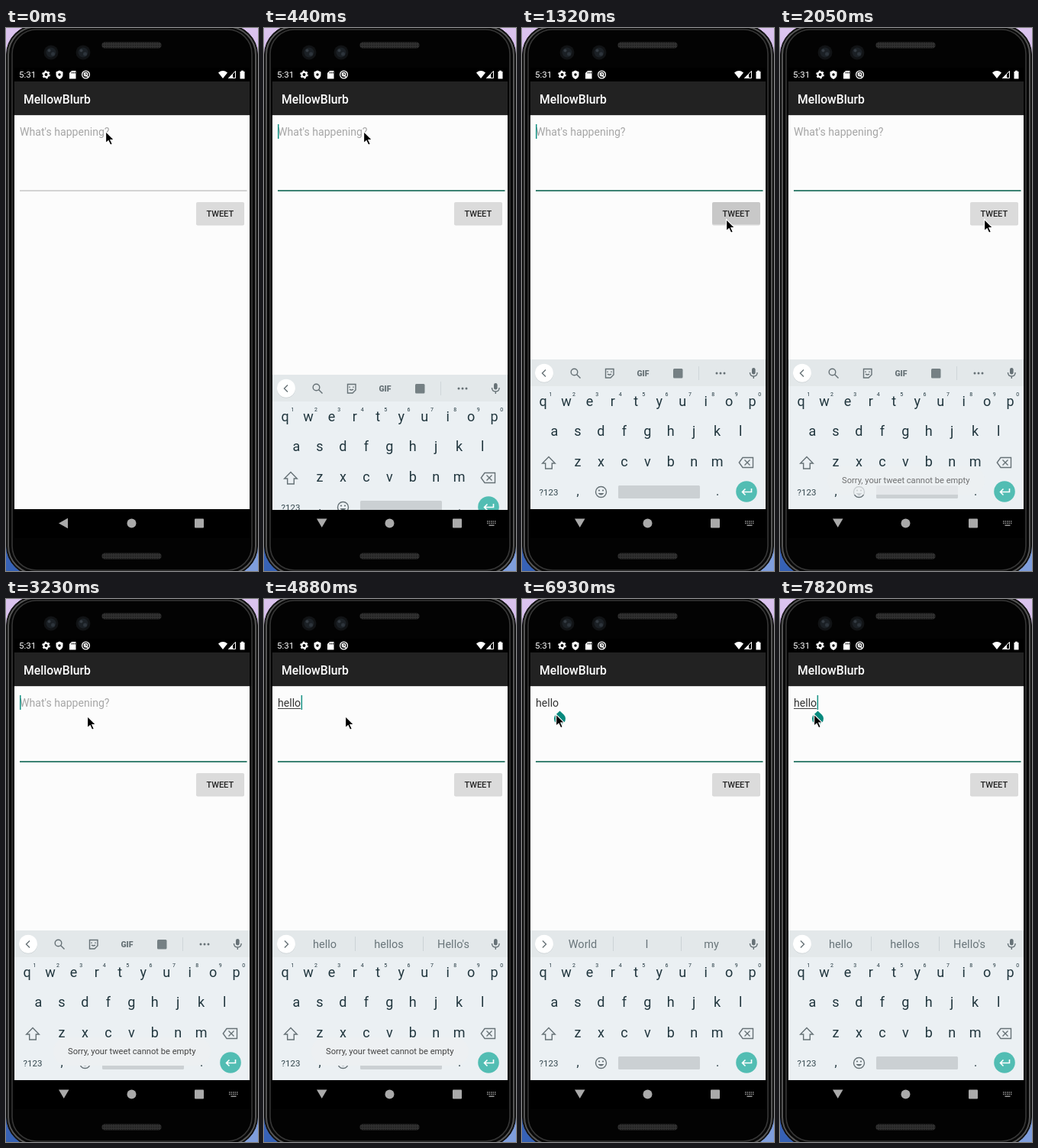
An HTML page that plays this animation: 330x711 px, repeating every 8000 ms.

```html
<!DOCTYPE html>
<html lang="en">
<head>
<meta charset="utf-8">
<title>Compose screen</title>
<style>
html, body { margin: 0; width: 330px; height: 711px; overflow: hidden; background: #000; }
svg { display: block; font-family: Roboto, sans-serif; }
.mid { text-anchor: middle; }
.line { fill: none; stroke: #667176; stroke-width: 1.4; }
</style>
</head>
<body>
<svg width="330" height="711" viewBox="0 0 330 711">
  <defs>
    <linearGradient id="wall" x2="0" y2="1">
      <stop offset="0" stop-color="#dcc4ef"/><stop offset=".5" stop-color="#8f86c8"/><stop offset="1" stop-color="#3561b5"/>
    </linearGradient>
    <pattern id="mesh" width="3" height="3" patternUnits="userSpaceOnUse">
      <rect width="3" height="3" fill="#303030"/><circle cx="1.5" cy="1.5" r=".8" fill="#191919"/>
    </pattern>
    <clipPath id="screen"><rect x="11" y="52" width="308" height="579"/></clipPath>
  </defs>

  <!-- phone -->
  <rect width="330" height="711" fill="url(#wall)"/>
  <rect x="290" y="660" width="40" height="51" fill="#7f9edd"/>
  <rect x=".5" y="-4" width="329" height="721" rx="39" fill="#080808" stroke="#1c1c1c"/>
  <rect x="3" y="-1.500" width="324" height="716" rx="36.500" fill="none" stroke="#555" stroke-width="2"/>
  <rect x="8" y="2" width="314" height="708" rx="32" fill="#030303" stroke="#363636" stroke-width="1.600"/>
  <g id="cameras"></g>
  <rect x="125.500" y="18.500" width="78" height="8" rx="4" fill="url(#mesh)"/>
  <rect x="125.500" y="687.500" width="78" height="8" rx="4" fill="url(#mesh)"/>
  <rect x="11" y="52" width="308" height="616"/>

  <!-- status bar -->
  <g fill="#fff">
    <text x="17" y="65.300" font-size="11.500">5:31</text>
    <circle cx="52.500" cy="61" r="3.100" fill="none" stroke="#fff" stroke-width="2.200"/>
    <circle cx="52.500" cy="61" r="4.700" fill="none" stroke="#fff" stroke-width="1.400" stroke-dasharray="2.400 2.520"/>
    <path d="M70 55.500l4.500 2v3.500q0 4-4.500 6q-4.500-2-4.500-6v-3.500z"/>
    <circle cx="70" cy="61" r="1.700" fill="#000"/>
    <path d="M86 56h5.500v10.500h-8.500v-7.500z"/>
    <path d="M86.300 57.500v2m2-2v2m2-2v2" stroke="#000"/>
    <g fill="none" stroke="#fff" stroke-width="1.300">
      <circle cx="104.500" cy="61" r="4.900"/><circle cx="104.500" cy="60.700" r="2.200"/><path d="M102 59l5.500 5.500"/>
    </g>
    <path d="M278 58.500q6-4.800 12 0l-6 7.500z"/>
    <path d="M300.500 56.500v9h-9z" fill="none" stroke="#fff"/><path d="M297 60v6h-6z"/>
    <path d="M306.500 57h1.500v-1.300h3v1.300h1.500v9.500h-6z"/>
  </g>

  <!-- app -->
  <rect x="11" y="70" width="308" height="44" fill="#222"/>
  <text x="23" y="98.600" font-size="15.700" font-weight="500" fill="#fff">MellowBlurb</text>
  <rect x="11" y="114" width="308" height="516" fill="#fcfcfc"/>
  <rect x="11" y="114" width="308" height="1" opacity=".12"/>
  <rect id="rule" x="18" width="297.500"/>
  <text id="field" x="18" y="141" font-size="14.100"></text>
  <rect id="composing" x="18" y="143" height="1" fill="#444"/>
  <rect id="caret" y="126" width="1.500" height="19" fill="#159184"/>
  <path id="handle" d="M49.500 146.500l5.300 5a7.500 7.500 0 1 1-10.600 0z" fill="#07897d"/>
  <rect x="249" y="229" width="63" height="29.500" rx="2" fill="#000" opacity=".14"/>
  <rect id="button" x="249" y="228" width="63" height="29" rx="2"/>
  <text x="280.300" y="247" class="mid" font-size="11" font-weight="500" fill="#222">TWEET</text>

  <!-- keyboard -->
  <g clip-path="url(#screen)">
    <g id="keyboard">
      <rect x="11" y="434" width="308" height="196" fill="#ebf0f3"/>
      <rect x="11" y="434" width="308" height="35" fill="#e3e8ea"/>
      <circle cx="29" cy="452.500" r="12" fill="#c9cfd2"/><circle cx="29" cy="451.700" r="12" fill="#fff"/>
      <path id="chevron" class="line"/>
      <g id="tools">
        <circle cx="68.500" cy="450.500" r="4.300" class="line"/><path d="M71.500 453.500l5 5" class="line"/>
        <path d="M109.500 446.500h10.500v7.500l-4 4h-6.500z" class="line"/>
        <path d="M112 449.500v1.500m5-1.500v1.500m-5 2q2.500 2 5 0" class="line"/>
        <text x="158.500" y="456" class="mid" font-size="10.500" font-weight="900" fill="#667176">GIF</text>
        <rect x="198" y="446" width="12.500" height="12.500" rx="1.500" fill="#758084"/>
        <path d="M231.500 443v18" stroke="#d0d6d9"/>
        <g fill="#667176"><circle cx="255" cy="452" r="1.500"/><circle cx="260" cy="452" r="1.500"/><circle cx="265" cy="452" r="1.500"/></g>
      </g>
      <g id="words" font-size="14.500" fill="#69757a" class="mid">
        <path d="M119.500 442v19M208.500 442v19" stroke="#cbd2d5"/>
        <text x="79.500" y="457"></text><text x="163.500" y="457"></text><text x="248" y="457"></text>
      </g>
      <rect x="301" y="445" width="4.600" height="8.500" rx="2.300" fill="#667176"/>
      <path d="M298.500 451q0 5 4.800 5t4.800-5M303.300 456v3" class="line"/>
      <g id="keys" class="mid" fill="#21363e"></g>
      <path d="M35 561.500l8.300 8.500h-4v7h-8.600v-7h-4z" class="line"/>
      <path d="M289 562.500h13.500v13h-13.500l-4.700-6.500zM291.500 565.500l7 7m0-7l-7 7" class="line"/>
      <text x="35" y="611.500" class="mid" font-size="11.500" fill="#34474e">?123</text>
      <circle cx="103.500" cy="607.500" r="7" class="line"/>
      <path d="M99.500 609q4 5 8 0z" fill="#667176"/>
      <circle cx="101" cy="605.500" r="1.100" fill="#667176"/><circle cx="106" cy="605.500" r="1.100" fill="#667176"/>
      <rect x="126" y="599" width="107" height="17" rx="1.500" fill="#cbd0d3"/>
      <circle cx="294" cy="607" r="13.800" fill="#52bdb3"/>
      <path d="M300.500 603v4.500h-12m4-4l-4 4l4 4" fill="none" stroke="#fff" stroke-width="1.600"/>
    </g>
  </g>
  <g id="toast">
    <rect x="62" y="574" width="206" height="37" rx="18.500" fill="#edf0f2"/>
    <text x="164.800" y="596.300" class="mid" font-size="11.150" fill="#444">Sorry, your tweet cannot be empty</text>
  </g>

  <!-- navigation bar -->
  <g fill="#aaa">
    <path id="back"/>
    <circle cx="164.500" cy="648.500" r="6"/><rect x="247" y="642.500" width="12" height="12" rx="1"/>
    <g id="switcher" stroke="#999" stroke-width="1.400">
      <path d="M292 646h12m-12 2.500h12" stroke-dasharray="1.400 1.100"/><path d="M294.500 651.300h7"/>
    </g>
  </g>
  <path id="mouse" d="M-.4.600v15l3.500-3 2.600 5.700 2.600-1.200-2.500-5.500h4.800z" fill="#000" stroke="#fff" stroke-width="1.100"/>
</svg>
<script>
const LOOP = 8000, STEP = 147;
const $ = id => document.getElementById(id);
const set = (id, attrs) => { for (const k in attrs) $(id).setAttribute(k, attrs[k]); };
const show = (id, on) => set(id, { visibility: on ? "visible" : "hidden" });
const ramp = (t, a, b) => Math.min(1, Math.max(0, (t - a) / (b - a)));

$("cameras").innerHTML = [59, 101].map(x =>
  `<circle cx="${x}" cy="32" r="9.500" fill="#111315"/><circle cx="${x}" cy="32" r="6.500" fill="#1b2025"/>
   <circle cx="${x - 2.5}" cy="29.500" r="2" fill="#343b42"/><circle cx="${x + 2.5}" cy="34" r="2.500" fill="#2d343b"/>`).join("");

const label = (x, y, size, s) => `<text x="${x}" y="${y}" font-size="${size}">${s}</text>`;
const row = (letters, x, y) => [...letters].map((c, i) => label(x + 30.45 * i, y, 18, c)).join("");
$("keys").innerHTML = row("qwertyuiop", 27.5, 495) + row("asdfghjkl", 42.5, 534) + row("zxcvbnm", 73, 574)
  + label(73, 611.5, 16, ",") + label(256, 611.5, 16, ".")
  + [..."1234567890"].map((c, i) => label(37.5 + 30.4 * i, 482, 7, c)).join("");

// time, typed text, suggestions
const typing = [
  [0, "", ""],
  [4130, "h", "h he how"],
  [4280, "he", "he her hey"],
  [4580, "hel", "hel help held"],
  [4730, "hell", "hell hello he'll"],
  [4880, "hello", "hello hellos Hello's"],
  [5320, "hello ", "World I my"],
  [7370, "hello", "hello hellos Hello's"],
];
const textWidth = [0, 7.8, 15.2, 18.7, 22.1, 30.1, 33.6];

// pointer stops: time, x, y
const stops = [
  [0, 131, 135], [590, 131, 135], [1170, 268, 262], [1320, 268, 250], [2200, 268, 250], [2780, 107, 153],
  [5620, 107, 153], [5890, 41, 131], [6200, 41, 131], [6640, 45, 150.5], [LOOP, 45, 150.5],
];
const caretOn = [[150, 740], [1170, 1760], [2190, 2780], [3230, 3830], [4130, 5760], [6350, 6930], [7080, LOOP]];

function pointer(t) {
  const i = stops.findIndex(s => s[0] > t);
  const [t0, x0, y0] = stops[i - 1], [t1, x1, y1] = stops[i];
  const u = ramp(t, t0, t1), e = u * u * (3 - 2 * u);
  return [x0 + (x1 - x0) * e, y0 + (y1 - y0) * e];
}

function draw(t) {
  const q = Math.floor((t + 10) / STEP) * STEP; // the screen refreshes in steps
  const [, text, hints] = typing.filter(s => s[0] <= t).pop();
  const focused = t >= 150, open = t >= 290;

  $("field").textContent = text || "What's happening?";
  set("field", { fill: text ? "#333" : "#a6a6a6" });
  set("composing", { width: textWidth[text.length] });
  show("composing", text && !text.endsWith(" "));
  const caretX = 18 + (t >= 7080 ? textWidth[5] : textWidth[text.length]);
  set("caret", { x: caretX + (text ? .5 : 0) });
  show("caret", caretOn.some(([a, b]) => t >= a && t < b));
  show("handle", t >= 6790);
  set("rule", focused ? { y: 212, height: 2, fill: "#3c8273" } : { y: 212.3, height: 1.5, fill: "#c6c6c6" });
  set("button", { fill: t >= 1320 && t < 1470 ? "#c8c8c8" : "#dbdbdb" });

  const rise = 1 - (1 - ramp(q, 200, 720)) ** 3.7;
  set("keyboard", { transform: `translate(0 ${Math.round(197 * (1 - rise))})` });
  show("keyboard", open);
  show("tools", open && !text);
  show("words", open && text);
  set("chevron", { d: text ? "M27 447.500l4.500 4.500l-4.500 4.500" : "M31 447.500l-4.500 4.500l4.500 4.500" });
  const words = hints.split(" ");
  $("words").querySelectorAll("text").forEach((el, i) => el.textContent = words[i] || "");

  set("toast", { opacity: t < 1760 ? 0 : ramp(q, 1650, 2200) * (1 - ramp(q, 5050, 5430)) });
  set("back", { d: open ? "M69 642.500h13.500l-6.750 11.500z" : "M69 648.500l12-6.700v13.400z" });
  show("switcher", open);
  set("mouse", { transform: `translate(${pointer(Math.min(q, LOOP - 1))})` });
}

function tick() {
  draw(performance.now() % LOOP);
  requestAnimationFrame(tick);
}
tick();
</script>
</body>
</html>
```
